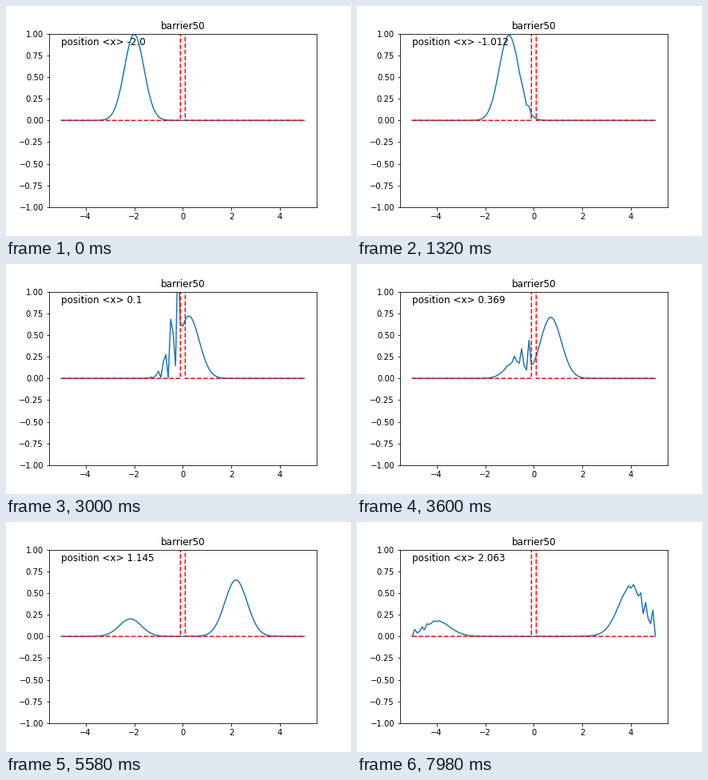
A matplotlib script for the animation above (8 s loop, 432 by 288 pixels).

```python
import numpy as np
import matplotlib.pyplot as plt
from matplotlib.animation import FuncAnimation

# Grid, barrier and wave packet
DX = 0.1
X = np.linspace(-5, 5, 101)
V = np.where(np.abs(X) < DX / 2, 50.0, 0.0)
X0, SIGMA, K0 = -2.0, 0.4, 20.0

# Time per step, and the slight loss of norm of the integrator
DT = 0.00496
LOSS = 1.5e-4
TICK = 20
TICKS_PER_STEP = 3
TICKS = 400

# Finite-difference Hamiltonian with hard walls at both ends
inner = slice(1, -1)
n = len(X) - 2
hop = np.full(n - 1, -0.5 / DX**2)
H = np.diag(1 / DX**2 + V[inner]) + np.diag(hop, 1) + np.diag(hop, -1)
energy, modes = np.linalg.eigh(H)

psi0 = np.exp(-((X - X0) / (2 * SIGMA)) ** 2 + 1j * K0 * X)[inner]
psi0 /= np.sqrt(np.sum(np.abs(psi0) ** 2) * DX)
coef = modes.T @ psi0


def density(step):
    psi = modes @ (coef * np.exp(-1j * energy * DT * step))
    rho = np.zeros(len(X))
    rho[inner] = np.abs(psi) ** 2 * np.exp(-LOSS * step)
    return rho


plt.rcParams["font.family"] = "DejaVu Sans"
fig, ax = plt.subplots(figsize=(6, 4), dpi=72)
fig.subplots_adjust(left=0.125, right=0.9, bottom=0.125, top=0.88)
wave, = ax.plot(X, density(0))
ax.plot(X, V, "r--")
ax.set_xlim(-5.5, 5.5)
ax.set_ylim(-1, 1)
ax.set_title("barrier50")
label = ax.text(-5, 0.87, "", fontsize=12)


def update(tick):
    rho = density(tick // TICKS_PER_STEP)
    mean = np.sum(X * rho) * DX
    wave.set_ydata(rho)
    label.set_text(f"position <x> {round(float(mean), 3)}")
    return wave, label


anim = FuncAnimation(fig, update, frames=TICKS, interval=TICK,
                     repeat=True, cache_frame_data=False)
plt.show()
```
